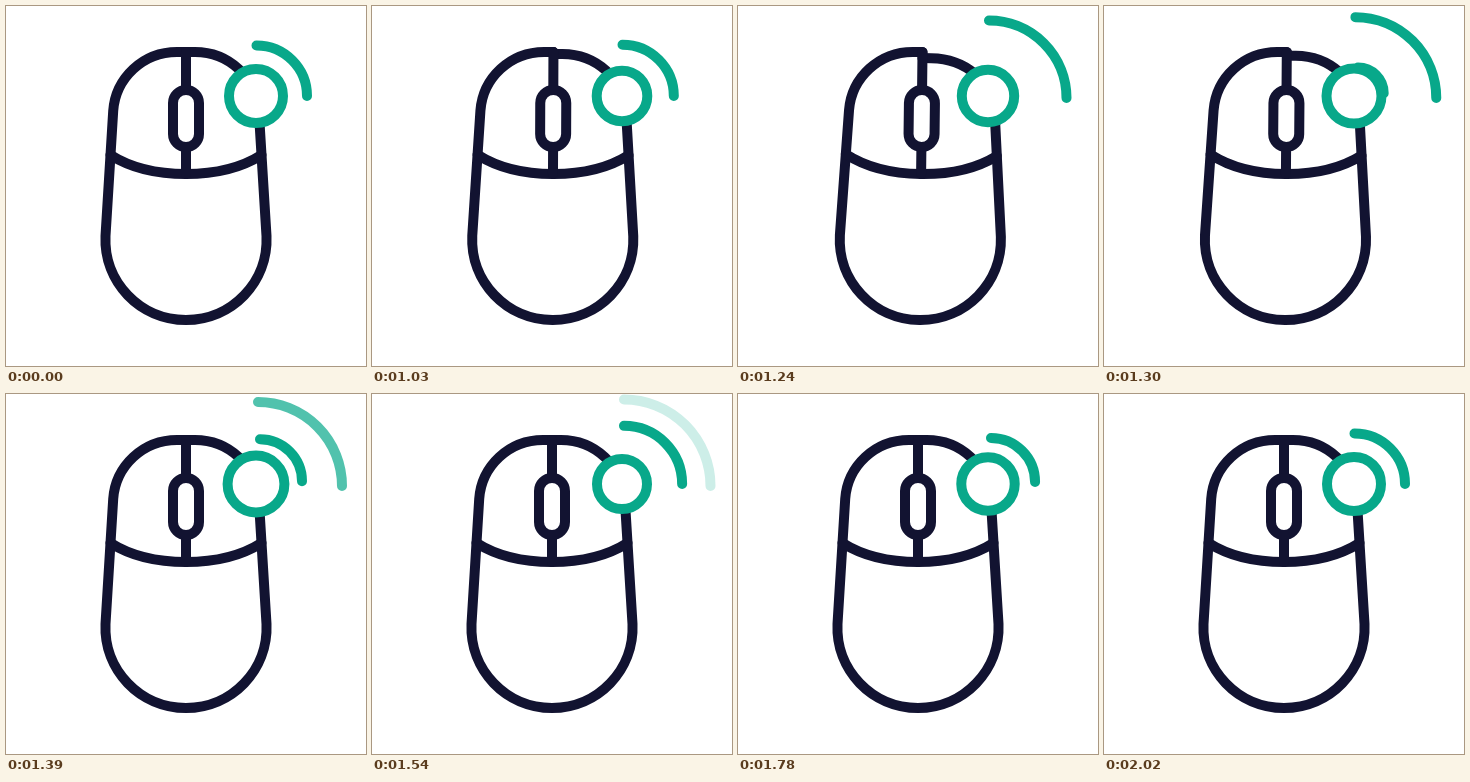
An HTML page with a canvas that plays this animation: 360x360 px, repeating every 2.05 s.

```html
<!DOCTYPE html>
<html lang="en">
<head>
<meta charset="utf-8">
<title>Mouse click</title>
<style>
html, body { margin: 0; width: 100%; height: 100%; overflow: hidden; background: #fff; }
canvas { display: block; width: 360px; height: 360px; }
</style>
</head>
<body>
<canvas id="stage"></canvas>
<script>
const LOOP = 2050, HOLD = 1030, STEP = 30;
const NAVY = '#121331', TEAL = '#08a88a';
const canvas = document.getElementById('stage');
const ctx = canvas.getContext('2d');
const ratio = window.devicePixelRatio || 1;
canvas.width = canvas.height = 360 * ratio;

// Keys are [time, value]
const press = [[1000, 0], [1030, 0.32], [1150, 1.06], [1240, 1], [1390, 0]];
const ring = [[1000, 27], [1030, 25.3], [1090, 23.6], [1240, 26.2], [1375, 28.5], [1530, 25], [1770, 26.7], [2000, 27]];
const wave = {
  r: [[1000, 50.5], [1030, 51.3], [1120, 62], [1240, 77.5], [1390, 84], [1540, 86.5], [1600, 87]],
  x: [[1000, 250.5], [1240, 251], [1390, 252]],
  y: [[1000, 90], [1240, 92]],
  alpha: [[1295, 1], [1390, 0.7], [1540, 0.2], [1600, 0]]
};
const echo = {
  r: [[1285, 25], [1390, 42], [1525, 58.3], [1765, 44], [2000, 50.5]],
  x: [[1390, 254], [1540, 252], [1770, 253], [2000, 250.5]],
  y: [[1390, 87.2], [1540, 90], [1770, 88], [2000, 90]],
  alpha: [[1285, 1]]
};

// Cubic interpolation that is flat at peaks, troughs and both ends
function track(keys, t) {
  const last = keys.length - 1;
  if (t <= keys[0][0]) return keys[0][1];
  if (t >= keys[last][0]) return keys[last][1];
  const i = keys.findIndex(k => k[0] > t) - 1;
  const rate = j => (keys[j + 1][1] - keys[j][1]) / (keys[j + 1][0] - keys[j][0]);
  const slope = j => {
    if (j === 0 || j === last) return 0;
    const a = rate(j - 1), b = rate(j);
    return a * b <= 0 ? 0 : 2 * a * b / (a + b);
  };
  const [t0, v0] = keys[i], [t1, v1] = keys[i + 1];
  const span = t1 - t0, u = (t - t0) / span, w = 1 - u;
  return v0 * (1 + 2 * u) * w * w + v1 * u * u * (3 - 2 * u) +
    span * u * w * (slope(i) * w - slope(i + 1) * u);
}

function line(x0, y0, x1, y1) {
  ctx.beginPath();
  ctx.moveTo(x0, y0);
  ctx.lineTo(x1, y1);
  ctx.stroke();
}

function drawMouse(p) {
  ctx.save();
  ctx.translate(180, 435);
  ctx.rotate(0.0116 * p);
  ctx.translate(-180, -435);
  ctx.strokeStyle = NAVY;

  // Left button, body and right side
  ctx.beginPath();
  ctx.moveTo(180, 46);
  ctx.lineTo(171, 46);
  ctx.bezierCurveTo(137, 46, 109.5, 72, 107.2, 105);
  ctx.lineTo(99.5, 230);
  ctx.bezierCurveTo(97.5, 276, 134, 314, 180, 314);
  ctx.bezierCurveTo(226, 314, 262.5, 276, 260.5, 230);
  ctx.lineTo(252.8, 105);
  ctx.stroke();

  // Right button
  const top = 46 + 6 * p;
  ctx.beginPath();
  ctx.moveTo(180, top);
  ctx.lineTo(189, top);
  ctx.bezierCurveTo(223, top, 250.5, 72 + 3 * p, 252.8, 105);
  ctx.stroke();

  ctx.beginPath();
  ctx.moveTo(104.5, 149);
  ctx.bezierCurveTo(125, 162, 152, 168, 180, 168);
  ctx.bezierCurveTo(208, 168, 235, 162, 255.5, 149);
  ctx.stroke();

  line(180, 46, 180, 84);
  line(180, 141, 180, 168);
  ctx.beginPath();
  ctx.arc(180, 97, 13, Math.PI, 0);
  ctx.arc(180, 128, 13, 0, Math.PI);
  ctx.closePath();
  ctx.stroke();
  ctx.restore();
}

function drawArc(arc, t) {
  ctx.globalAlpha = track(arc.alpha, t);
  ctx.beginPath();
  ctx.arc(track(arc.x, t), track(arc.y, t), track(arc.r, t), -Math.PI / 2, 0);
  ctx.stroke();
  ctx.globalAlpha = 1;
}

function draw(t) {
  ctx.setTransform(ratio, 0, 0, ratio, 0, 0);
  ctx.fillStyle = '#fff';
  ctx.fillRect(0, 0, 360, 360);
  ctx.lineWidth = 10;
  ctx.lineCap = ctx.lineJoin = 'round';
  drawMouse(track(press, t));

  ctx.strokeStyle = TEAL;
  if (t < 1600) drawArc(wave, t);
  if (t > 1285) drawArc(echo, t);
  ctx.beginPath();
  ctx.arc(250, 90, track(ring, t), 0, Math.PI * 2);
  ctx.fill();
  ctx.stroke();
}

const start = performance.now();
function tick() {
  const t = (performance.now() - start) % LOOP;
  draw(t < HOLD ? 0 : HOLD + Math.floor((t - HOLD) / STEP) * STEP);
  requestAnimationFrame(tick);
}
tick();
</script>
</body>
</html>
```
